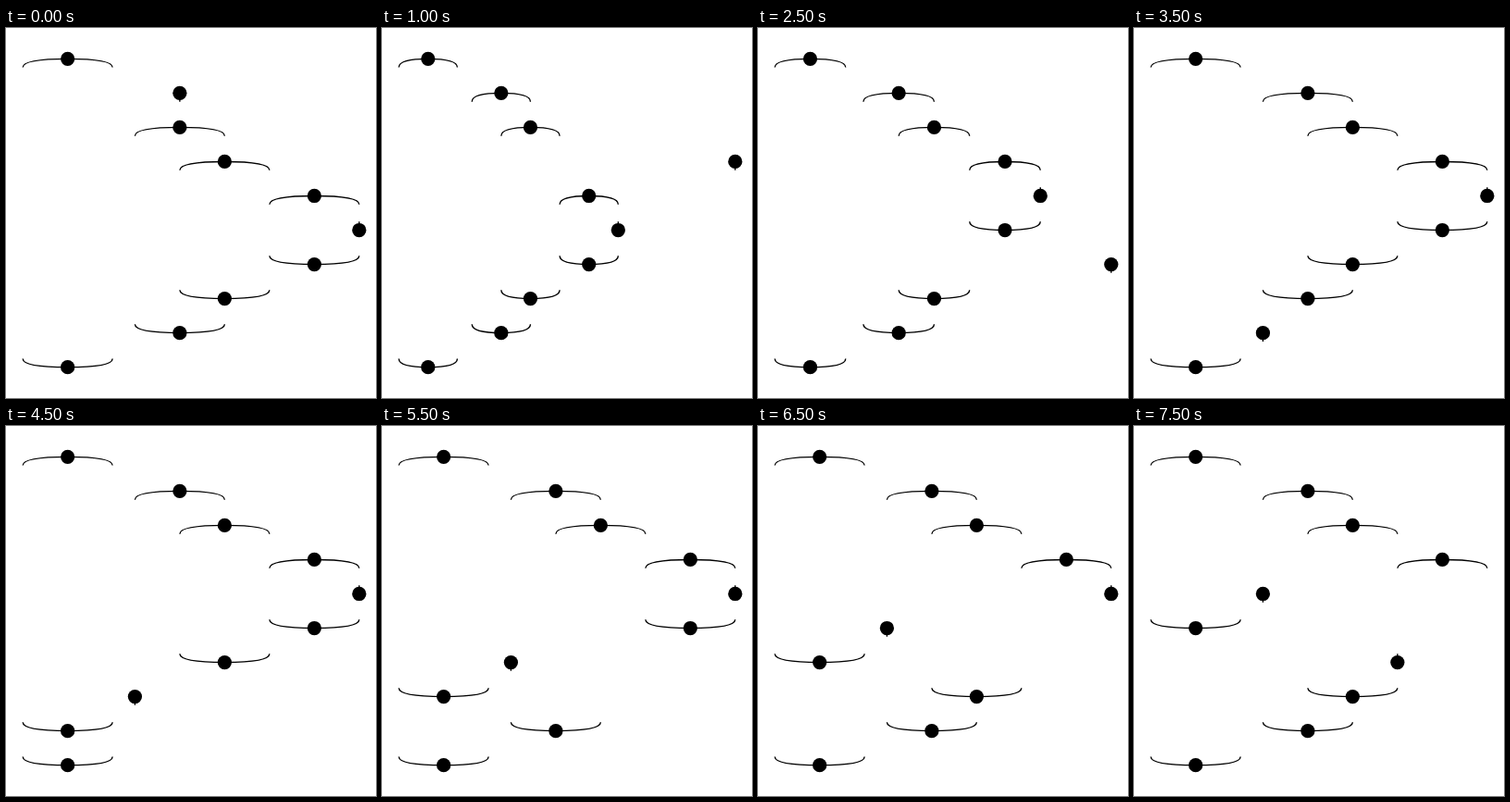
An HTML page that plays this animation: 400x400 px, repeating every 8000 ms.

```html
<!DOCTYPE html>
<html lang="en">
<head>
<meta charset="utf-8">
<title>Spiral rewriting</title>
<style>
  html, body { margin: 0; width: 100%; height: 100%; overflow: hidden; background: #fff; }
  svg { display: block; width: 400px; height: 400px; }
  path { fill: none; stroke: #000; stroke-width: 1.39; }
</style>
</head>
<body>
<svg viewBox="0 0 400 400"><path id="wires"/><g id="dots"></g></svg>
<script>
const STEP = 500;
const LEFT = 400 / 22, SPAN = 400 / 1.1;
const ROW = 400 / 10.8, DROP = ROW / 4, RADIUS = 7.64;

// Number of wires entering and leaving each kind of box.
const KINDS = {
  unit: { ins: 0, outs: 1 },
  counit: { ins: 1, outs: 0 },
  cap: { ins: 0, outs: 2 },
  cup: { ins: 2, outs: 0 }
};
const box = (kind, off) => ({ kind, off, ...KINDS[kind] });

const start = [
  box('cap', 0), box('unit', 2), box('cap', 1), box('cap', 2), box('cap', 3),
  box('counit', 4), box('cup', 3), box('cup', 2), box('cup', 1), box('cup', 0)
];

// Row of the upper box in each successive interchange.
const swaps = [1, 2, 3, 4, 5, 6, 7, 7, 8, 6, 7, 5, 6, 4, 5];

// The lower box slides up on the left, shifting the offset of the other.
function interchange(state, row) {
  const next = state.slice();
  const upper = state[row], lower = state[row + 1];
  next[row] = lower;
  next[row + 1] = { ...upper, off: upper.off + lower.outs - lower.ins };
  return next;
}

const states = [start];
for (const row of swaps) states.push(interchange(states[states.length - 1], row));

const column = off => off < 2 ? off * 5 : off * 4 - 1;
const halfWidth = b => b.ins + b.outs === 2 ? 2 : 0;
const centre = b => column(b.off) + halfWidth(b);

const wires = document.getElementById('wires');
const dots = start.map(() => {
  const dot = document.createElementNS('http://www.w3.org/2000/svg', 'circle');
  dot.setAttribute('r', RADIUS);
  document.getElementById('dots').append(dot);
  return dot;
});

function draw(state) {
  const unit = SPAN / Math.max(...state.map(b => centre(b) + halfWidth(b)));
  let d = '';
  state.forEach((b, i) => {
    const x = LEFT + centre(b) * unit;
    const y = 200 + (i - 4.5) * ROW;
    const half = halfWidth(b) * unit;
    const end = y + (b.outs ? DROP : -DROP);
    for (const tip of half ? [x - half, x + half] : [x]) {
      d += `M${x} ${y}Q${tip} ${y} ${tip} ${end}`;
    }
    dots[i].setAttribute('cx', x);
    dots[i].setAttribute('cy', y);
  });
  wires.setAttribute('d', d);
}

let shown = -1;
const origin = performance.now();
function tick() {
  const elapsed = Math.max(0, performance.now() - origin);
  const index = Math.floor(elapsed / STEP) % states.length;
  if (index !== shown) draw(states[shown = index]);
  requestAnimationFrame(tick);
}
tick();
</script>
</body>
</html>
```
